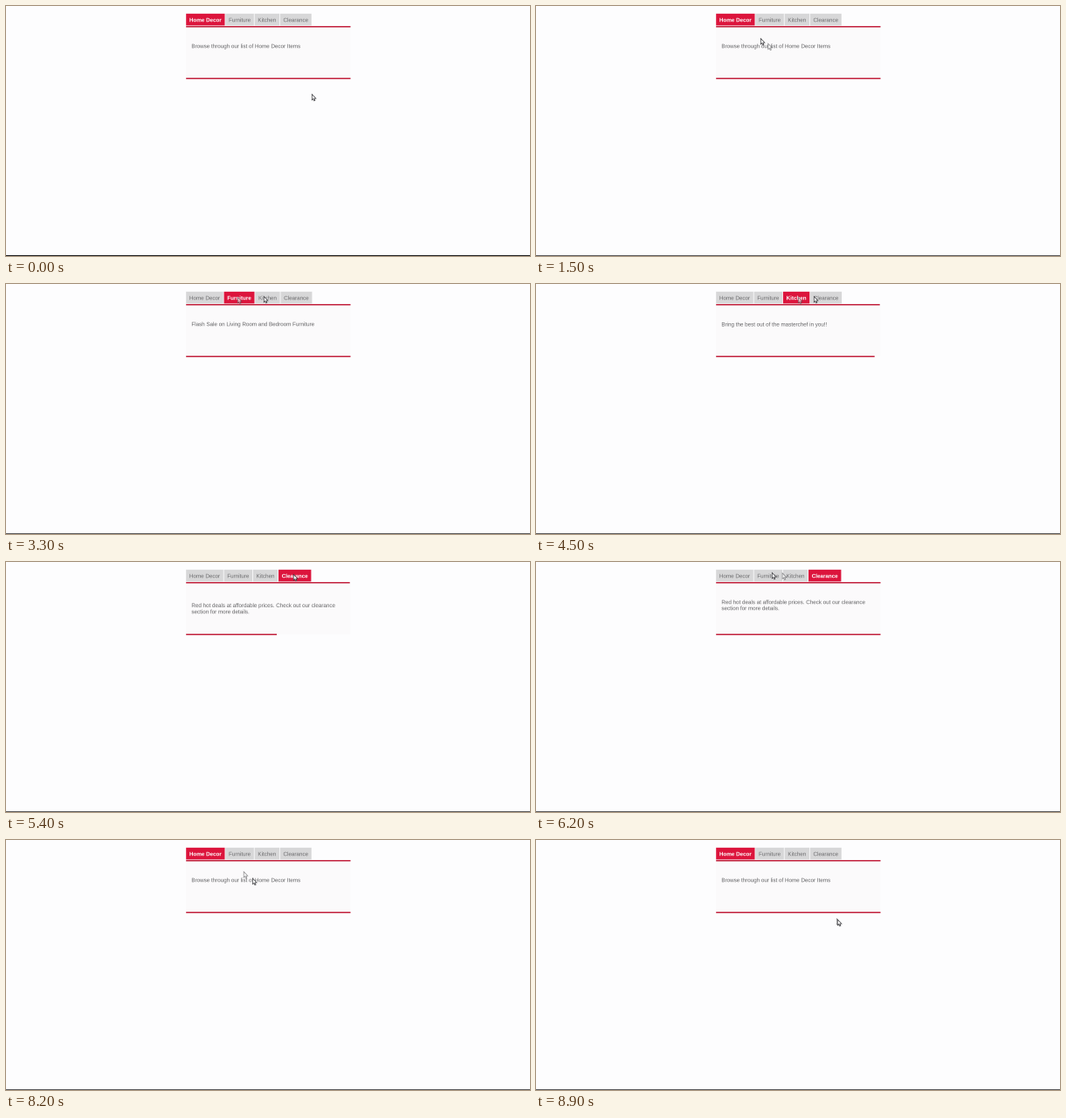
Recreate the animation shown at these times as an HTML page with a canvas. Size 600 px wide and 287 px high, loop 9 s.

```html
<!DOCTYPE html>
<html lang="en">
<head>
<meta charset="utf-8">
<title>Tabs</title>
<style>
  html, body { margin: 0; width: 100%; height: 100%; overflow: hidden; background: #fdfdfe; }
  canvas { display: block; width: 100%; height: 100%; }
</style>
</head>
<body>
<canvas id="stage" width="600" height="287"></canvas>
<script>
const W = 600, H = 287, LOOP = 9000, STEP = 100;
const LEFT = 206.2, WIDTH = 188.3;
const RED = '#dc143c', RULE = '#c2203c';
const UNIT = W / 1536; // stage px per layout px
const DETAIL = 4;

const stage = document.getElementById('stage').getContext('2d');
stage.imageSmoothingQuality = 'medium';

// The page is drawn large and scaled down, which keeps small text smooth
const page = document.createElement('canvas');
page.width = W * DETAIL;
page.height = H * DETAIL;
const ctx = page.getContext('2d');
ctx.scale(DETAIL, DETAIL);

const tabs = [
  { label: 'Home Decor', lines: ['Browse through our list of Home Decor Items'] },
  { label: 'Furniture', lines: ['Flash Sale on Living Room and Bedroom Furniture'] },
  { label: 'Kitchen', lines: ['Bring the best out of the masterchef in you!!'] },
  { label: 'Clearance', lines: ['Red hot deals at affordable prices. Check out our clearance',
                                'section for more details.'] },
];

// Time of click, tab index
const clicks = [[-2000, 0], [2200, 1], [3740, 2], [5080, 3], [7095, 0]];

// Pointer stops: time, x, y
const stops = [
  [400, 350, 101], [1500, 257, 37], [1800, 265, 15], [3200, 265, 15],
  [3300, 295, 14], [4400, 300, 15], [4500, 318, 14], [4800, 329, 14],
  [5700, 329, 14], [6200, 270, 12], [6500, 241, 13], [7800, 241, 13],
  [8800, 344, 90], [8900, 345, 91],
];

function pointerAt(t) {
  const i = stops.findIndex(stop => stop[0] >= t);
  if (i < 1) return stops[0].slice(1);
  const [t0, x0, y0] = stops[i - 1], [t1, x1, y1] = stops[i];
  const k = (t - t0) / (t1 - t0);
  return [x0 + (x1 - x0) * k, y0 + (y1 - y0) * k];
}

// CSS "ease": cubic-bezier(.25, .1, .25, 1)
function ease(x) {
  if (x <= 0) return 0;
  if (x >= 1) return 1;
  const curve = (a, b, s) => 3 * a * s * (1 - s) ** 2 + 3 * b * s * s * (1 - s) + s ** 3;
  let lo = 0, hi = 1;
  for (let i = 0; i < 20; i++) {
    const mid = (lo + hi) / 2;
    if (curve(0.25, 0.25, mid) < x) lo = mid; else hi = mid;
  }
  return curve(0.1, 1, lo);
}

function box(color, x, y, w, h) {
  ctx.fillStyle = color;
  ctx.fillRect(x, y, w, h);
}

function setFont(bold) {
  ctx.font = (bold ? 'bold ' : '') + '16px "Liberation Sans", Arial, sans-serif';
}

function text(str, x, y, color, bold) {
  ctx.save();
  ctx.translate(x, y);
  ctx.scale(UNIT, UNIT);
  setFont(bold);
  ctx.fillStyle = color;
  ctx.fillText(str, 0, 0);
  ctx.restore();
}

function drawTabs(active) {
  const pad = 3.75, gap = 0.8;
  let x = LEFT;
  tabs.forEach(({ label }, i) => {
    const on = i === active;
    setFont(on);
    const w = ctx.measureText(label).width * UNIT + 2 * pad;
    box(on ? RED : '#d7d7d8', x, 8.8, w, 13.6);
    text(label, x + pad, 18.2, on ? '#fff' : '#6c6c6e', on);
    x += w + gap;
  });
}

function drawPanel(lines, p) {
  box('#fbfafb', LEFT, 24, WIDTH - 0.4, 59);
  box(RULE, LEFT, 23, WIDTH - (p < 1 ? 0.8 : 0), 1.5);
  box(RULE, LEFT, 82.5, WIDTH * p, 1.5);
  const drop = 8.5 * (1 - p);
  lines.forEach((line, i) => text(line, 212.4, 48.3 + drop + i * 7.05, '#646466'));
}

function drawPointer([x, y], alpha) {
  const shape = [[0, 0], [0, 6.6], [1.5, 5.3], [2.5, 7.6], [3.6, 7.1], [2.6, 4.9], [4.6, 4.8]];
  ctx.save();
  ctx.globalAlpha = alpha;
  ctx.translate(x + 0.3, y + 0.3);
  ctx.beginPath();
  shape.forEach(([px, py]) => ctx.lineTo(px, py));
  ctx.closePath();
  ctx.fillStyle = '#fff';
  ctx.fill();
  ctx.lineWidth = 0.7;
  ctx.strokeStyle = '#3a3a3e';
  ctx.stroke();
  ctx.restore();
}

function draw(now) {
  const t = Math.floor((now % LOOP) / STEP) * STEP;
  const [start, active] = clicks.filter(click => click[0] <= t).pop();

  box('#fdfdfe', 0, 0, W, H);
  drawTabs(active);
  drawPanel(tabs[active].lines, ease((t - start) / 1000));
  box(t < 400 ? '#1e1e20' : '#5c5c5e', 0, H - 1, W, 1);

  // A fast pointer leaves its previous position behind
  const here = pointerAt(t), before = pointerAt(t - STEP);
  if (Math.hypot(here[0] - before[0], here[1] - before[1]) > 1) drawPointer(before, 0.6);
  drawPointer(here, 1);

  stage.drawImage(page, 0, 0, W, H);
}

const begin = performance.now();
function loop() {
  draw(performance.now() - begin);
  requestAnimationFrame(loop);
}
loop();
</script>
</body>
</html>
```
